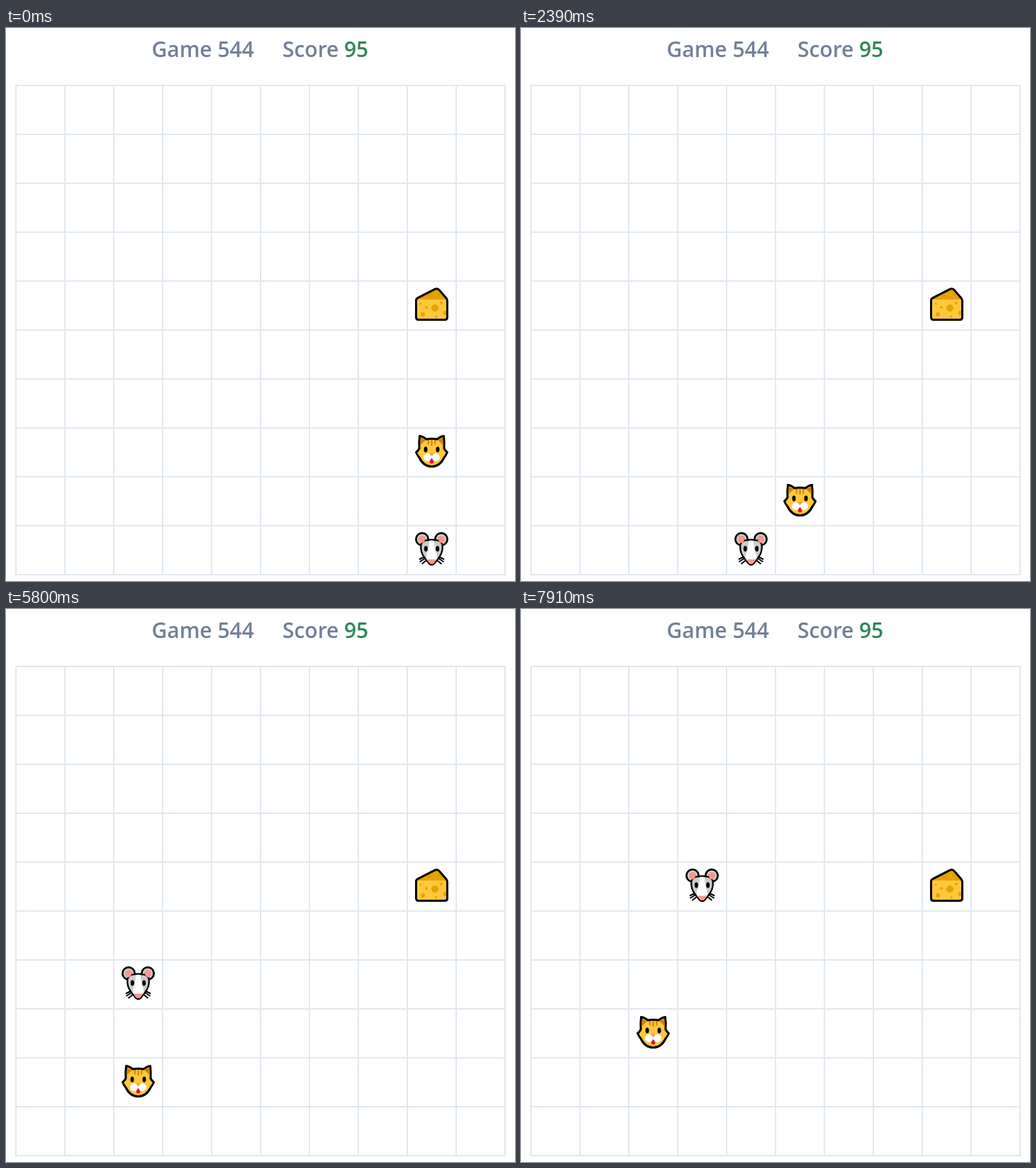
Recreate the animation shown at these times as an HTML page with a canvas. Size 718 by 780 pixels, loop 8 s.

```html
<!DOCTYPE html>
<html lang="en">
<head>
<meta charset="utf-8">
<title>Cat and mouse</title>
<style>
  html, body { margin: 0; width: 100%; height: 100%; overflow: hidden; background: #fff; }
  canvas, svg { position: absolute; left: 0; top: 0; display: block; }
  text { font: 600 30px "Open Sans", "Noto Sans", sans-serif; fill: #718096; }
  .score { fill: #2f855a; }
</style>
</head>
<body>
<canvas id="board" width="718" height="780"></canvas>
<svg width="718" height="780">
  <text x="205.5" y="41">Game 544</text>
  <text x="390" y="41">Score</text>
  <text class="score" x="477" y="41">95</text>
</svg>
<script>
const ctx = document.getElementById('board').getContext('2d');
const LOOP = 8000, CELL = 69, SIZE = 10;

// start time, mouse column and row, cat column and row
const steps = [
  [0, 8, 9, 8, 7],
  [290, 7, 9, 8, 8],
  [990, 6, 9, 7, 8],
  [1680, 5, 9, 6, 8],
  [2390, 4, 9, 5, 8],
  [3090, 3, 9, 4, 8],
  [3790, 2, 9, 4, 9],
  [4480, 2, 8, 4, 8],
  [5170, 2, 7, 3, 8],
  [5800, 2, 6, 2, 8],
  [6500, 2, 5, 2, 9],
  [7200, 2, 4, 2, 8],
  [7910, 3, 4, 2, 7]
];

function fill(d, color) {
  ctx.fillStyle = color;
  ctx.fill(new Path2D(d));
}

function stroke(d, width = 3, color = '#000') {
  ctx.strokeStyle = color;
  ctx.lineWidth = width;
  ctx.stroke(new Path2D(d));
}

function oval(x, y, rx, color, ry = rx) {
  ctx.fillStyle = color;
  ctx.beginPath();
  ctx.ellipse(x, y, rx, ry, 0, 0, 2 * Math.PI);
  ctx.fill();
}

// Draws one half, then its reflection in the middle of the 47 px icon.
function mirrored(draw) {
  draw();
  ctx.save();
  ctx.translate(47, 0);
  ctx.scale(-1, 1);
  draw();
  ctx.restore();
}

function inside(d, draw) {
  ctx.save();
  ctx.clip(new Path2D(d));
  draw();
  ctx.restore();
}

function cheese() {
  const body = 'M1.5 18Q1.5 16 4 14.6L28.5 2.2Q32 .8 34.3 3.8L44 15Q45.5 17 45.5 19V42Q45.5 45.5 42 45.5H5Q1.5 45.5 1.5 42Z';
  inside(body, () => {
    fill('M0 0H47V47H0Z', '#ffc83d');
    fill('M0 0H47V17H0Z', '#e8a200');
    oval(20, 12, 2.5, '#d89400', 1.3);
    oval(33, 10, 2, '#d89400', 1.2);
    const holes = [[28, 29, 5], [16, 28, 2], [11, 38, 3], [37, 22, 2], [43, 36, 3.2], [8, 23, 1.4], [30, 41, 1.7]];
    for (const [x, y, r] of holes) oval(x, y, r, '#e8a200');
  });
  stroke(body);
}

function cat() {
  const head = 'M6.5 2.5Q11 3 16 7Q23.5 5.5 31 7Q36 3 40.5 2.5Q41.5 10 41 20Q43 24 45.5 25.5Q43.5 30 41 33Q35 45.5 23.5 45.5Q12 45.5 6 33Q3.5 30 1.5 25.5Q4 24 6 20Q5.5 10 6.5 2.5Z';
  fill(head, '#ffc83d');
  mirrored(() => {
    fill('M8 5L15 8.5Q11 11 8 15Z', '#d67d00');
    stroke('M18.8 8V14.5', 2, '#d67d00');
    oval(15, 21.5, 2.5, '#000', 4);
    oval(18.5, 32.5, 6.5, '#fff', 5.8);
  });
  stroke('M23.5 7V16', 2, '#d67d00');
  fill('M19.5 26.5H27.5L23.5 31.5Z', '#f3a15c');
  fill('M23.5 33.5L26.5 38Q26 41.5 23.5 41.5Q21 41.5 20.5 38Z', '#e81224');
  stroke(head);
}

function mouse() {
  const head = 'M9.5 18Q12 12 19 12.5Q23.5 11 28 12.5Q35 12 37.5 18Q38.5 28 33 35L27 43Q23.5 47 20 43L14 35Q8.5 28 9.5 18Z';
  mirrored(() => {
    oval(10, 10, 10, '#000');
    oval(10, 10, 7.3, '#ccc');
    oval(10, 10, 5, '#f7978b');
    stroke('M14 34.5L6 38.5M15 36.5L6.5 42M17 39L9.5 45', 2);
  });
  stroke(head, 4.5);
  fill(head, '#ccc');
  inside(head, () => {
    fill('M20 10H27Q26.5 23 31 32L32 47H15L16 32Q20.5 23 20 10Z', '#fff');
    fill('M16 38.5H31V47H16Z', '#f7978b');
  });
  mirrored(() => {
    oval(9.5, 11, 4.4, '#f7978b');
    oval(15.3, 23.5, 2.5, '#000', 4);
  });
}

function place(icon, column, row) {
  ctx.save();
  ctx.translate(25 + CELL * column, 90 + CELL * row);
  icon();
  ctx.restore();
}

function drawGrid() {
  const length = CELL * SIZE + 2;
  ctx.fillStyle = '#e2e8f0';
  for (let i = 0; i <= SIZE; i++) {
    ctx.fillRect(13 + CELL * i, 80, 2, length);
    ctx.fillRect(13, 80 + CELL * i, length, 2);
  }
}

function render(now) {
  const time = now % LOOP;
  const [, mouseX, mouseY, catX, catY] = steps.findLast(step => step[0] <= time) || steps[0];
  ctx.fillStyle = '#fff';
  ctx.fillRect(0, 0, 718, 780);
  drawGrid();
  place(cheese, 8, 4);
  place(cat, catX, catY);
  place(mouse, mouseX, mouseY);
  requestAnimationFrame(render);
}

ctx.lineJoin = 'round';
render(performance.now());
</script>
</body>
</html>
```
